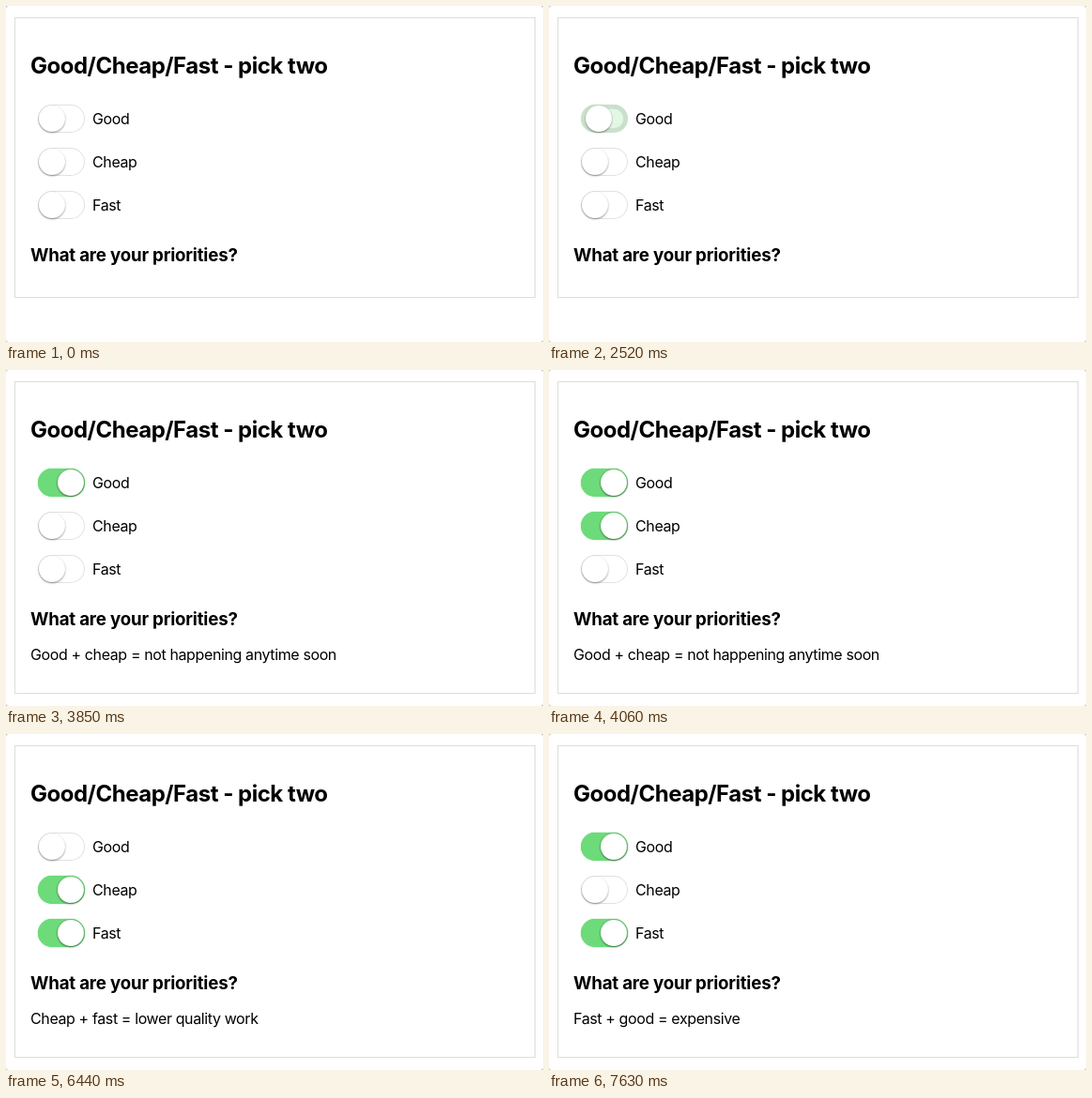
Animation of 572 by 358 pixels, one loop 8000 ms. Source, as an HTML page:

```html
<!DOCTYPE html>
<html lang="en">
<head>
<meta charset="utf-8">
<title>Pick two</title>
<style>
  html, body { margin: 0; width: 100%; height: 100%; overflow: hidden; background: #b5b5b5; }
  .stage {
    position: relative; width: 572px; height: 358px;
    background: #fff; border-radius: 3px;
    color: #000; font: 16px/20px Inter, "Open Sans", sans-serif; letter-spacing: -.024em;
  }
  .stage * { position: absolute; margin: 0; box-sizing: border-box; white-space: nowrap; }
  .stage * { animation: 8s step-end infinite; }

  .card { left: 9px; top: 12px; width: 555px; height: 299px; border: 1px solid #ddd; animation-name: grow; }
  h1 { left: 26px; top: 49px; font-size: 24px; line-height: 30px; letter-spacing: -.0205em; }
  h2 { left: 26px; top: 254px; font-size: 18.72px; line-height: 24px; letter-spacing: -.0105em; }
  p { left: 26px; top: 293px; visibility: hidden; }
  label { left: 92px; }

  /* --p is each switch's progress from off (0) to on (1) */
  .switch {
    --p: 0;
    --green: calc(var(--p) * 100%);
    left: 34px; width: 50px; height: 30px; border-radius: 15px;
    background: color-mix(in srgb, #6ddb7a var(--green), #fff);
    box-shadow:
      inset 0 0 0 calc(1px + 19px * var(--p)) color-mix(in srgb, #6ddb7a var(--green), #e1e1e1),
      0 0 2px rgb(109 219 122 / calc(.6 * var(--p)));
  }
  .knob {
    left: 1px; top: 1px; width: 28px; height: 28px; border-radius: 50%;
    background: #fff;
    box-shadow: 0 1px 2px rgb(0 0 0 / .42), 0 0 2px rgb(0 0 0 / calc(.3 * var(--p)));
    transform: translateX(calc(20px * var(--p)));
  }
  .row1 { top: 105px; }
  .row2 { top: 151px; }
  .row3 { top: 197px; }
  label.row1 { top: 110px; }
  label.row2 { top: 156px; }
  label.row3 { top: 202px; }

  .switch.row1 { animation-name: good; }
  .switch.row2 { animation-name: cheap; }
  .switch.row3 { animation-name: fast; }
  .slow { animation-name: slow; }
  .rough { animation-name: rough; }
  .costly { animation-name: costly; }

  @keyframes good {
    0% { --p: 0; }
    31.5% { --p: .2; } 32.375% { --p: .72; } 33.25% { --p: .95; } 34.125% { --p: 1; }
    77.875% { --p: .6; } 78.75% { --p: .17; } 79.625% { --p: .02; } 80.5% { --p: 0; }
    92.75% { --p: .3; } 93.625% { --p: .78; } 94.5% { --p: .97; } 95.375%, 100% { --p: 1; }
  }
  @keyframes cheap {
    0% { --p: 0; }
    48.125% { --p: 0; } 49% { --p: .47; } 49.875% { --p: .86; } 50.75% { --p: 1; }
    92.75% { --p: .7; } 93.625% { --p: .22; } 94.5% { --p: .03; } 95.375%, 100% { --p: 0; }
  }
  @keyframes fast {
    0% { --p: 0; }
    77.875% { --p: .4; } 78.75% { --p: .83; } 79.625% { --p: .98; } 80.5%, 100% { --p: 1; }
  }
  @keyframes grow { 48.125%, 100% { height: 333px; } }
  @keyframes slow { 48.125% { visibility: visible; } 77.875%, 100% { visibility: hidden; } }
  @keyframes rough { 77.875% { visibility: visible; } 92.75%, 100% { visibility: hidden; } }
  @keyframes costly { 92.75%, 100% { visibility: visible; } }
</style>
</head>
<body>
<div class="stage">
  <div class="card"></div>
  <h1>Good/Cheap/Fast - pick two</h1>
  <div class="switch row1"><div class="knob"></div></div><label class="row1">Good</label>
  <div class="switch row2"><div class="knob"></div></div><label class="row2">Cheap</label>
  <div class="switch row3"><div class="knob"></div></div><label class="row3">Fast</label>
  <h2>What are your priorities?</h2>
  <p class="slow">Good + cheap = not happening anytime soon</p>
  <p class="rough">Cheap + fast = lower quality work</p>
  <p class="costly">Fast + good = expensive</p>
</div>
</body>
</html>
```
